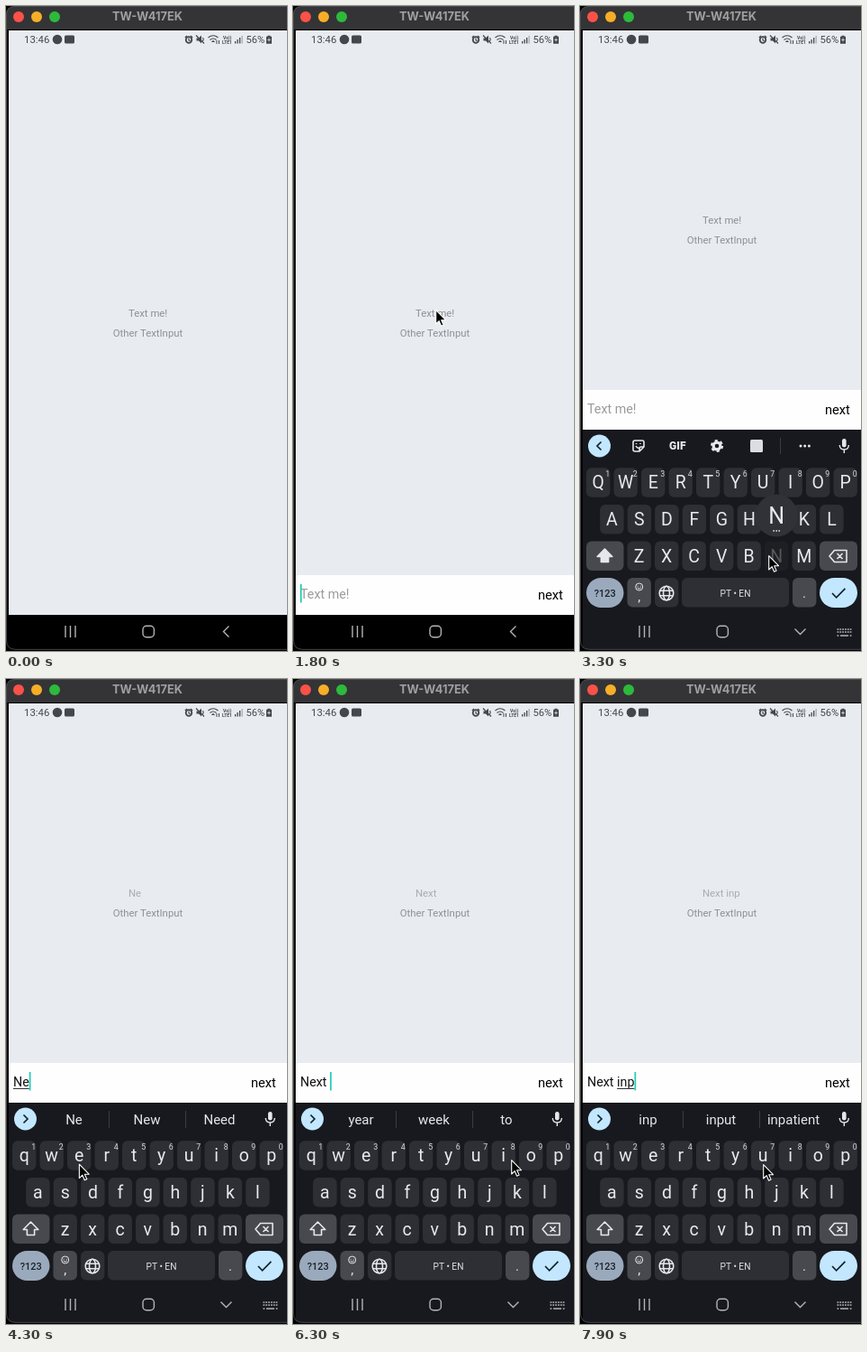
Recreate the animation shown at these times as an HTML page. Size 312x714 px, loop 8 s.

```html
<!DOCTYPE html>
<html lang="en">
<head>
<meta charset="utf-8">
<title>Keyboard accessory input</title>
<style>
html, body { margin: 0; width: 100%; height: 100%; overflow: hidden; background: #000; }
svg { display: block; width: 312px; height: 714px; font-family: Roboto, "Noto Sans", sans-serif; }
text { white-space: pre; }
.mid { text-anchor: middle; }
.line { fill: none; stroke: #e6e7ea; stroke-width: 1.6; stroke-linejoin: round; }
.letter { font-size: 19.5px; fill: #e8e9ec; text-anchor: middle; }
.small { font-size: 8.8px; fill: #d8d9dc; text-anchor: middle; }
.word { font-size: 15px; fill: #e6e7ea; text-anchor: middle; }
.dark { fill: none; stroke: #10212d; stroke-width: 1.7; }
.nav { fill: none; stroke: #b4b4b8; stroke-width: 1.4; }
.status { fill: #45484b; }
.thin { fill: none; stroke: #45484b; stroke-width: 1.2; }
</style>
</head>
<body>
<svg viewBox="0 0 312 714">
  <clipPath id="win"><path d="M0 10Q0 0 10 0H312V712H10Q0 712 0 702Z"/></clipPath>
  <g clip-path="url(#win)">
    <rect width="312" height="714"/>
    <rect width="312" height="26" fill="#343436"/>
    <circle cx="14" cy="12" r="6" fill="#fb5149"/>
    <circle cx="34" cy="12" r="6" fill="#f7ae27"/>
    <circle cx="54" cy="12" r="6" fill="#2dba3c"/>
    <text class="mid" x="157" y="16.2" font-family="Inter, sans-serif" font-size="12.8" font-weight="700" fill="#a0a0a2">TW-W417EK</text>

    <rect x="3" y="27" width="309" height="647" fill="#e8ecf0"/>
    <g class="status">
      <text x="20" y="41" font-size="11.4">13:46</text>
      <circle cx="57" cy="37" r="5.3"/>
      <rect x="65" y="32.5" width="11" height="9" rx="1.5"/>
      <circle class="thin" cx="203" cy="37.5" r="3.3" style="stroke-width:1.8"/>
      <path class="thin" d="M203 35.5v2.3l1.6 1M198.8 35l2.2-2M207.2 35l-2.2-2"/>
      <path d="M211.5 35.5h2.5l3-3v9l-3-3h-2.5z"/>
      <path class="thin" d="M211 32.5l9 9M218.5 35q1.5 2 0 4"/>
      <path class="thin" d="M224.5 35q5.5-4.5 11 0M226.5 37.5q3.5-3 7 0M228.5 39.7q1.5-1.4 3 0"/>
      <path class="thin" d="M234 38v4M236.5 38v4" style="stroke-width:1"/>
      <text x="241" y="36.5" font-size="5" font-weight="700">Vo))</text>
      <text x="240" y="42" font-size="5" font-weight="700">LTE1</text>
      <path d="M254 39h1.3v2.5H254zM256.5 37h1.3v4.5h-1.3zM259 35h1.3v6.5H259z"/>
      <path d="M261.5 33h1.3v8.5h-1.3z" opacity=".4"/>
      <text x="266.5" y="41" font-size="11.2">56%</text>
      <path d="M290.5 32.8h3v1h1.5v8h-6v-8h1.5z"/>
      <path d="M292 35.5v4M290.3 37.5h3.4" stroke="#e8ecf0" stroke-width=".8"/>
    </g>

    <g id="page" font-size="11.35" fill="#8d9194">
      <text id="echo" x="136" y="344"></text>
      <text class="mid" x="157.5" y="366">Other TextInput</text>
    </g>

    <g id="bar" font-size="14.3">
      <rect x="3" y="630" width="309" height="52" fill="#fefefe"/>
      <text id="field" x="8" y="655.6"></text>
      <rect id="under" y="658" height="1" fill="#333"/>
      <rect id="caret" y="640" width="1.7" height="20.5" fill="#1ccdb9"/>
      <text x="272" y="657.3" font-size="14.6">next</text>
    </g>

    <g id="kb">
      <rect x="3" y="469" width="309" height="250" fill="#17191e"/>
      <g id="keys"></g>
      <rect x="7" y="633" width="41.5" height="33" rx="16.5" fill="#9aaabc"/>
      <text class="mid" x="27.7" y="654" font-size="11" font-weight="500" fill="#18222d">?123</text>
      <rect x="266" y="633" width="42" height="33" rx="16.5" fill="#c3e7ff"/>
      <path id="shift" class="line" d="M27.5 601l8.3 8.5h-4.2v6h-8.2v-6h-4.2z"/>
      <path class="line" d="M282.5 602.5h13.5v13h-13.5l-5.5-6.5zM285.5 606l6 6M291.5 606l-6 6"/>
      <g class="line">
        <circle cx="96" cy="650" r="7.8"/><ellipse cx="96" cy="650" rx="3.5" ry="7.8"/>
        <path d="M88.8 647.3h14.4M88.8 652.7h14.4"/>
      </g>
      <text class="letter" x="249" y="655" style="font-size:15px">.</text>

      <g id="plain">
        <text class="letter" x="65.7" y="656" style="font-size:15px">,</text>
        <text class="mid" x="172.5" y="653.7" font-size="10.4" fill="#e0e1e4">Português</text>
        <path class="dark" d="M294 644.5v6h-13.5M285 646l-4.5 4.5 4.5 4.5"/>
      </g>
      <g id="rich">
        <text class="letter" x="65.7" y="659" style="font-size:15px">,</text>
        <circle class="line" cx="65.7" cy="643" r="4" style="stroke-width:1"/>
        <path class="line" d="M63.7 644q2 2.3 4 0M64.2 641.8v.9M67.2 641.8v.9" style="stroke-width:1"/>
        <text class="mid" x="172.5" y="653.7" font-size="10.2" fill="#e0e1e4">PT • EN</text>
        <path class="dark" d="M280 650l4.6 4.8 9.8-10"/>
        <circle cx="21.5" cy="487" r="12.5" fill="#c3e7ff"/>
        <path id="chev" class="dark" d="M23.5 482.5l-4.5 4.5 4.5 4.5"/>
        <rect x="291" y="479" width="4.6" height="9.5" rx="2.3" fill="#e6e7ea"/>
        <path class="line" d="M288.3 486q0 5 5 5t5-5M293.3 491v4" style="stroke-width:1.4"/>
      </g>
      <g id="tools">
        <path class="line" d="M61 481h8q2 0 2 2v5l-5 5h-5q-2 0-2-2v-8q0-2 2-2zM71 488h-3q-2 0-2 2v3M62 487q1.5 3 3.5 2"/>
        <path class="line" d="M62.5 484v1M67 484v1"/>
        <text class="mid" x="108.3" y="491.2" font-size="12" font-weight="900" fill="#e6e7ea">GIF</text>
        <circle class="line" cx="152" cy="487" r="3.9" style="stroke-width:3.2"/>
        <circle class="line" cx="152" cy="487" r="6" style="stroke-width:2.2;stroke-dasharray:3.14 3.14"/>
        <rect x="189" y="480" width="14" height="14" rx="1.5" fill="#dcdde0"/>
        <path d="M222.5 478v18" stroke="#3a3c42"/>
        <g fill="#e6e7ea"><circle cx="245" cy="487" r="1.5"/><circle cx="249.7" cy="487" r="1.5"/><circle cx="254.4" cy="487" r="1.5"/></g>
      </g>
      <g id="words">
        <path d="M114.5 478v19M199.5 478v19" stroke="#3a3c42"/>
        <text class="word" x="75.5" y="493"></text>
        <text class="word" x="156.5" y="493"></text>
        <text class="word" x="237" y="493"></text>
      </g>
      <g id="pop">
        <circle r="23.5" fill="#303237"/>
        <text class="letter" y="9" style="font-size:25px"></text>
        <path d="M-3.8 17h1.6M-.8 17h1.6M2.2 17h1.6" stroke="#e6e7ea" stroke-width="1.6"/>
      </g>
    </g>

    <rect id="navbg" x="3" y="674" width="309" height="40"/>
    <g class="nav">
      <path d="M66 686v13M71.5 686v13M77 686v13"/>
      <rect x="152" y="686.3" width="12.4" height="12.4" rx="4"/>
      <path id="back" d="M247.5 686.5l-6 6 6 6"/>
      <g id="down">
        <path d="M238.5 689.5l6 6 6-6"/>
        <path d="M285.5 690h16M285.5 693h16" stroke-dasharray="1.8 1.03" stroke-width="1.7"/>
        <path d="M285.5 697h1.8M289 697h9M299.7 697h1.8" stroke-width="1.7"/>
      </g>
    </g>
  </g>
  <path d="M312 .5H10Q.5 .5 .5 10V702Q.5 712 10 712.3H312" fill="none" stroke="#505052" stroke-width=".9"/>
  <path id="mouse" d="M.7 .7V16L4.2 12.7 6.6 18.2 9.1 17.1 6.7 11.7H11.5Z" stroke="#fff" stroke-width="1.1" stroke-linejoin="round"/>
</svg>
<script>
const $ = id => document.getElementById(id);
const show = (el, on) => el.style.display = on ? '' : 'none';
const shiftY = (el, y) => el.setAttribute('transform', `translate(0 ${y})`);
const LOOP = 8000, STEP = 30.5;

// Input bar appears, keyboard rises, page lifts, keyboard rests, toolbar appears
const BAR = 1700, RISE = 1860, LIFT = 1900, REST = 1980, TOOLS = 2200;

// Pointer path: time, x, y
const path = [
  [600, 200, 690], [1400, 158, 336], [1800, 158, 336], [2000, 165, 336],
  [2350, 165, 336], [3150, 209, 608], [3500, 209, 608], [4000, 80, 533],
  [4250, 80, 533], [4650, 95, 612], [4850, 95, 612], [5100, 139, 544],
  [5400, 139, 544], [5800, 160, 650], [6000, 160, 650], [6300, 242, 532],
  [6600, 242, 532], [6950, 219, 612], [7150, 219, 612], [7500, 290, 532],
  [7650, 290, 532], [7900, 203, 537], [8000, 203, 537]
];

const presses = [[3250, 'N'], [4050, 'e'], [4700, 'x'], [5200, 't'],
  [5850, ' '], [6450, 'i'], [7000, 'n'], [7550, 'p']];
const HOLD = 150;

const suggestions = {
  'N': ['N', 'No', 'Não'],
  'Ne': ['Ne', 'New', 'Need'],
  'Nex': ['Nex', 'Next', 'Nexuses'],
  'Next': ['next', 'Next', 'NEXT'],
  'Next ': ['year', 'week', 'to'],
  'Next i': ['i', 'in', 'is'],
  'Next in': ['in', 'into', 'inside'],
  'Next inp': ['inp', 'input', 'inpatient']
};

function add(parent, tag, attrs, text = '') {
  const el = document.createElementNS('http://www.w3.org/2000/svg', tag);
  for (const k in attrs) el.setAttribute(k, attrs[k]);
  el.textContent = text;
  parent.append(el);
  return el;
}
const addKey = (x, y, w, fill) =>
  add($('keys'), 'rect', { x, y, width: w, height: 32.5, rx: 6, fill });

const KEY = '#2d2f34', SIDE = '#47494e';
const keys = {};
[['qwertyuiop', 20.2, 511.3], ['asdfghjkl', 35.4, 552], ['zxcvbnm', 65.7, 592.5]]
  .forEach(([row, x0, y]) => [...row].forEach((ch, i) => {
    const x = x0 + i * STEP;
    keys[ch] = { x, y, box: addKey(x - 13.2, y, 26.4, KEY),
      label: add($('keys'), 'text', { class: 'letter', x, y: y + 23 }) };
  }));
for (let i = 0; i < 10; i++) {
  const digit = (i + 1) % 10, x = 20.2 + i * STEP;
  add($('plain'), 'text', { class: 'letter', x, y: 495 }, digit);
  add($('rich'), 'text', { class: 'small', x: x + 10.5, y: 520.7 }, digit);
}
addKey(7, 592.5, 41.5, SIDE);
addKey(266, 592.5, 42, SIDE);
addKey(52.5, 633, 26.4, SIDE);
addKey(83, 633, 26.4, KEY);
addKey(113, 633, 119, KEY);
addKey(236, 633, 26.4, SIDE);

const pen = document.createElement('canvas').getContext('2d');
function width(s) {
  pen.font = '14.3px Roboto, "Noto Sans", sans-serif';
  return pen.measureText(s).width;
}

function pointer(t) {
  const i = path.findIndex(p => p[0] > t);
  if (i < 1) return path[path.length - 1];
  const a = path[i - 1], b = path[i];
  const u = (t - a[0]) / (b[0] - a[0]), e = u * u * (3 - 2 * u);
  return a.map((v, k) => v + (b[k] - v) * e);
}

function drawText(t) {
  const done = presses.filter(p => t >= p[0] + HOLD);
  const typed = done.map(p => p[1]).join('');
  const edited = done.length ? done[done.length - 1][0] + HOLD : BAR;
  const end = width(typed), start = width(typed.slice(0, typed.lastIndexOf(' ') + 1));
  $('field').textContent = $('echo').textContent = typed || 'Text me!';
  $('field').setAttribute('fill', typed ? '#111' : '#9b9b9b');
  $('echo').setAttribute('fill', typed ? '#a9adb0' : '#8d9194');
  $('under').setAttribute('x', 8 + start);
  $('under').setAttribute('width', end - start);
  $('caret').setAttribute('x', 8 + end);
  show($('caret'), Math.floor((t - edited) / 500) % 2 === 0);
  return typed;
}

function drawKeyboard(t, typed) {
  const rich = t >= TOOLS, caps = rich && !typed;
  const left = Math.max(0, 1 - (t - RISE) / (REST - RISE));
  shiftY($('kb'), (rich ? 0 : 7) + 205 * left * left);
  show($('kb'), t >= RISE);
  show($('plain'), !rich);
  show($('rich'), rich);
  show($('tools'), caps);
  show($('words'), typed);
  $('shift').style.fill = caps ? '#e6e7ea' : 'none';
  $('chev').setAttribute('transform', typed ? 'rotate(180 21.5 487)' : '');
  const list = suggestions[typed] || [];
  $('words').querySelectorAll('text').forEach((el, i) => {
    el.textContent = list[i] || '';
    el.style.fontWeight = i === 1 && /^Nex/.test(list[1]) ? 700 : 400;
  });

  const press = presses.find(p => t >= p[0] && t < p[0] + HOLD);
  const down = press && keys[press[1].toLowerCase()];
  for (const ch in keys) {
    const { box, label } = keys[ch], on = keys[ch] === down;
    label.textContent = caps ? ch.toUpperCase() : ch;
    label.style.fill = on ? '#55575c' : '';
    box.setAttribute('fill', on ? '#1d1f23' : KEY);
  }
  show($('pop'), down);
  if (down) {
    $('pop').setAttribute('transform', `translate(${down.x} ${down.y - 28.5})`);
    $('pop').querySelector('text').textContent = press[1];
  }
}

function draw(t) {
  const lift = t >= LIFT;
  shiftY($('page'), lift ? -103 : 0);
  shiftY($('bar'), lift ? -205 : 0);
  show($('bar'), t >= BAR);
  drawKeyboard(t, drawText(t));
  $('navbg').setAttribute('fill', t >= RISE ? '#17191e' : '#000');
  show($('back'), !lift);
  show($('down'), lift);
  const [, x, y] = pointer(t);
  show($('mouse'), t >= path[0][0]);
  $('mouse').setAttribute('transform', `translate(${x} ${y})`);
}

function tick() {
  draw(performance.now() % LOOP);
  requestAnimationFrame(tick);
}
tick();
</script>
</body>
</html>
```
